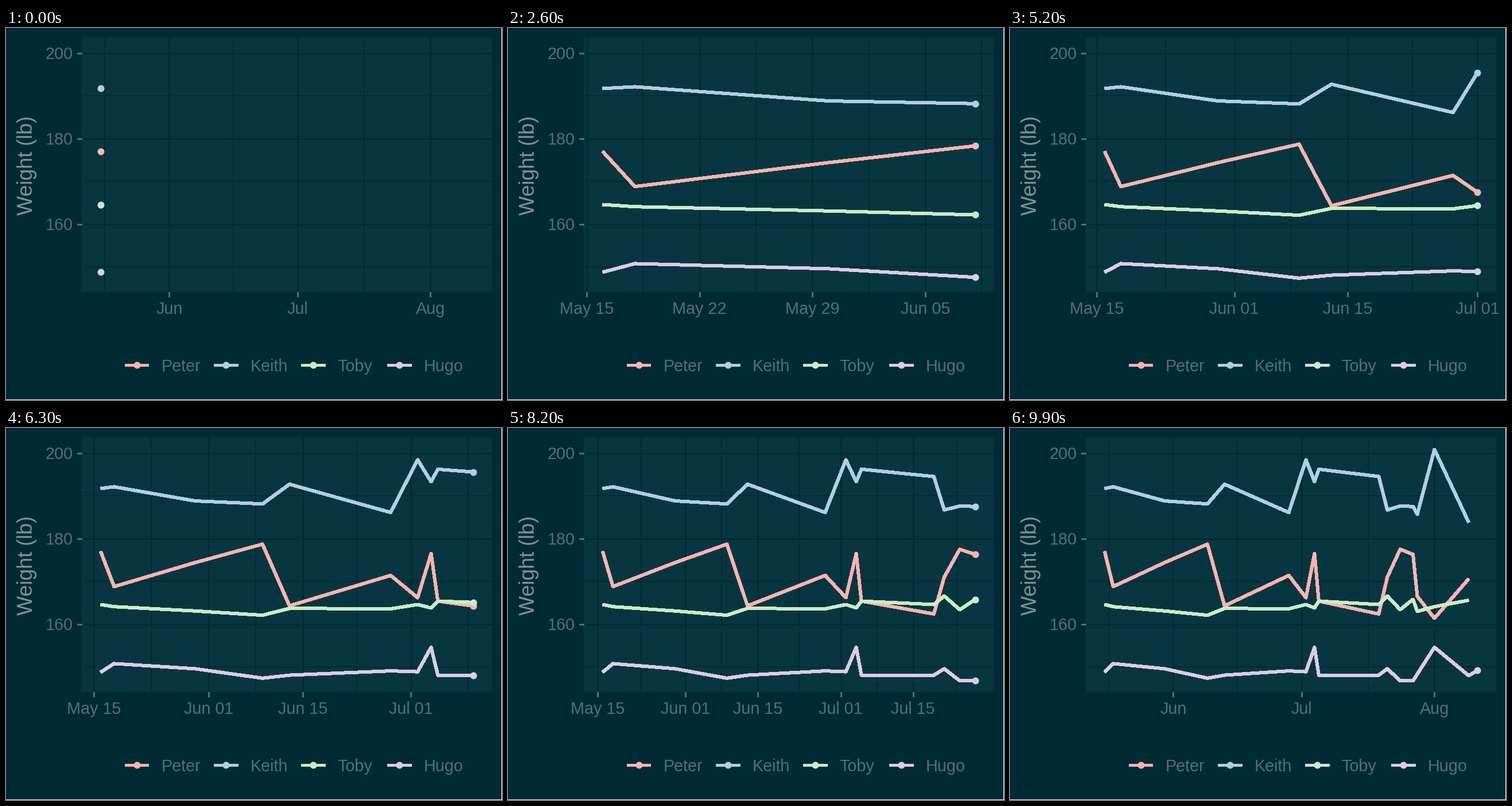
A matplotlib script for the animation above (10000 ms loop, 864 by 648 pixels).

```python
import numpy as np
import matplotlib.pyplot as plt
from matplotlib.animation import FuncAnimation
from matplotlib.collections import LineCollection
from matplotlib.dates import date2num, num2date
from matplotlib.patches import Rectangle

plt.rcParams["font.family"] = "Liberation Sans"
plt.rcParams["path.simplify"] = False

W, H = 864, 648
FRAMES, DAYS = 100, 87
START = date2num(np.datetime64("2017-05-16"))
LEFT, RIGHT, TOP, BOTTOM = 132.4, 846.4, 17.4, 460.4
Y_MIN, Y_MAX = 144.1, 203.5
BACK, PANEL, MUTED, TITLE = "#002B36", "#073642", "#586E75", "#839496"
FONT = 28.8

# Weigh-in days, counted from the start date
COMMON = [0, 2, 14, 24, 28, 43, 47, 49, 50, 64, 66, 69, 72, 73, 77, 85]
LAST = [d for d in COMMON if d != 73] + [87]

# name, colour, legend x, days, weights
SERIES = [
    ("Peter", "#FBB4AE", 227.5, COMMON,
     [177, 168.8, 174.4, 178.7, 164.3, 171.4, 166.2, 176.5, 165.4, 162.4,
      171, 177.5, 176.3, 166.5, 161.4, 170.6]),
    ("Keith", "#B3CDE3", 383, COMMON,
     [191.7, 192.1, 188.8, 188.1, 192.7, 186.1, 198.4, 193.3, 196.2, 194.5,
      186.7, 187.6, 187.5, 185.7, 200.8, 183.8]),
    ("Toby", "#CCEBC5", 535, COMMON,
     [164.6, 164.1, 163.1, 162.1, 163.7, 163.6, 164.6, 163.8, 165.4, 164.6,
      166.6, 163.4, 165.8, 163, 164.1, 165.6]),
    ("Hugo", "#DECBE4", 685, LAST,
     [148.8, 150.8, 149.6, 147.4, 148.1, 149.1, 148.9, 154.6, 148.1, 148.1,
      149.6, 146.8, 146.8, 154.6, 148, 149.2]),
]

# Candidate axis steps: day, two days, week, half month, month
STEP_SIZES = np.array([1, 2, 7, 15.22, 30.44])
HALF_MONTHS = np.array([-15, -1, 16, 30, 46, 60, 77, 91, 108])


def y_px(w):
    return BOTTOM - (np.asarray(w) - Y_MIN) / (Y_MAX - Y_MIN) * (BOTTOM - TOP)


def covering(at, lo, hi):
    """Shortest run of breaks that encloses the range."""
    return at[np.sum(at <= lo) - 1:np.searchsorted(at, hi) + 1]


def pretty_breaks(lo, hi, n=5):
    """Date breaks giving about n intervals, with their label format."""
    first = np.floor(lo)
    options = [np.arange(first, 140), np.arange(first, 140, 2),
               np.arange(-15, 140, 7), HALF_MONTHS, HALF_MONTHS[::2]]
    sets = [covering(at, lo, hi) for at in options]
    span = hi - lo
    best = 0
    if span > n:
        best = int(np.argmin(abs(span / STEP_SIZES - n)))
        count = len(sets[best]) - 1
        if count != n:
            other = best + 1 if count > n else best - 1
            if abs(len(sets[other]) - 1 - n) < abs(count - n):
                best = other
    at = sets[best]
    shown = at[(at >= lo - 1e-9) & (at <= hi + 1e-9)]
    return shown, "%b" if best == 4 else "%b %d"


def minor_breaks(at, lo, hi):
    """Midpoints, padded on both sides by the first interval."""
    if len(at) < 2:
        return np.array([])
    step = at[1] - at[0]
    padded = np.r_[at[0] - step, at, at[-1] + step]
    mid = (padded[:-1] + padded[1:]) / 2
    return mid[(mid >= lo) & (mid <= hi)]


fig = plt.figure(figsize=(W / 72, H / 72), dpi=72, facecolor="white")
ax = fig.add_axes([0, 0, 1, 1])
ax.set(xlim=(0, W), ylim=(H, 0))
ax.axis("off")


def box(x0, y0, x1, y1, color):
    ax.add_patch(Rectangle((x0, y0), x1 - x0, y1 - y0, fc=color, lw=0,
                           aa=False, zorder=0))


def segments(color, width, segs=()):
    lines = LineCollection(segs, colors=color, linewidths=width,
                           antialiaseds=False, zorder=1)
    ax.add_collection(lines, autolim=False)
    return lines


def stroke(xs, ys, color):
    return ax.plot(xs, ys, color=color, lw=5, aa=False, zorder=3,
                   solid_capstyle="butt", solid_joinstyle="round")[0]


def dot(xs, ys, color):
    return ax.plot(xs, ys, "o", color=color, ms=12, mew=0, aa=False,
                   zorder=4)[0]


def label(x, y, text, ha, color=MUTED, size=FONT, **kw):
    return ax.text(x, y, text, ha=ha, va="baseline", color=color,
                   fontsize=size, **kw)


box(0, 0, W - 1, H - 1, BACK)
box(132, 17, 846, 460, PANEL)

segments(BACK, 1.5, [[(LEFT, y), (RIGHT, y)] for y in y_px([190, 170, 150])])
for w in (200, 180, 160):
    y = float(y_px(w))
    segments(BACK, 3, [[(LEFT, y), (RIGHT, y)]])
    segments(MUTED, 3, [[(124.4, y), (LEFT, y)]])
    label(117, y + 10.6, str(w), "right")
label(46.5, 239, "Weight (lb)", "center", TITLE, 36,
      rotation=90, rotation_mode="anchor")

for name, color, x, _, _ in SERIES:
    stroke([x - 20.7, x + 20.7], [586.5, 586.5], color)
    dot([x], [586.5], color)
    label(x + 42.7, 597.5, name, "left")

minor = segments(BACK, 1.5)
major = segments(BACK, 3)
ticks = segments(MUTED, 3)
dates = [label(0, 498.3, "", "center") for _ in range(9)]
paths = [stroke([], [], s[1]) for s in SERIES]
heads = [dot([], [], s[1]) for s in SERIES]

# Every weigh-in lands on a whole step of the loop
KEYS = [np.rint(np.array(s[3]) * (FRAMES - 1) / DAYS) for s in SERIES]


def verticals(xs, y0, y1):
    return [[(x, y0), (x, y1)] for x in xs]


def draw(i):
    ends = [np.interp(i, k, s[3]) for k, s in zip(KEYS, SERIES)]
    span = max(ends) if i else DAYS
    lo, hi = -0.05 * span, 1.05 * span

    def x_px(d):
        return LEFT + (np.asarray(d) - lo) / (hi - lo) * (RIGHT - LEFT)

    at, fmt = pretty_breaks(lo, hi)
    xs = x_px(at)
    minor.set_segments(verticals(x_px(minor_breaks(at, lo, hi)), TOP, BOTTOM))
    major.set_segments(verticals(xs, TOP, BOTTOM))
    ticks.set_segments(verticals(xs, BOTTOM, BOTTOM + 8))
    for text in dates:
        text.set_text("")
    for text, d, x in zip(dates, at, xs):
        text.set_x(x)
        text.set_text(num2date(START + d).strftime(fmt))

    for s, keys, end, path, head in zip(SERIES, KEYS, ends, paths, heads):
        days, weights = np.array(s[3]), np.array(s[4])
        past = days < end
        xs = x_px(np.r_[days[past], end])
        ys = y_px(np.r_[weights[past], np.interp(end, days, weights)])
        path.set_data(xs, ys)
        path.set_visible(i > 0)
        head.set_data(xs[-1:], ys[-1:])
        head.set_visible(i <= keys[-1])
    return []


anim = FuncAnimation(fig, draw, frames=FRAMES, interval=100, repeat=True,
                     repeat_delay=0, init_func=lambda: draw(0))
plt.show()
```
